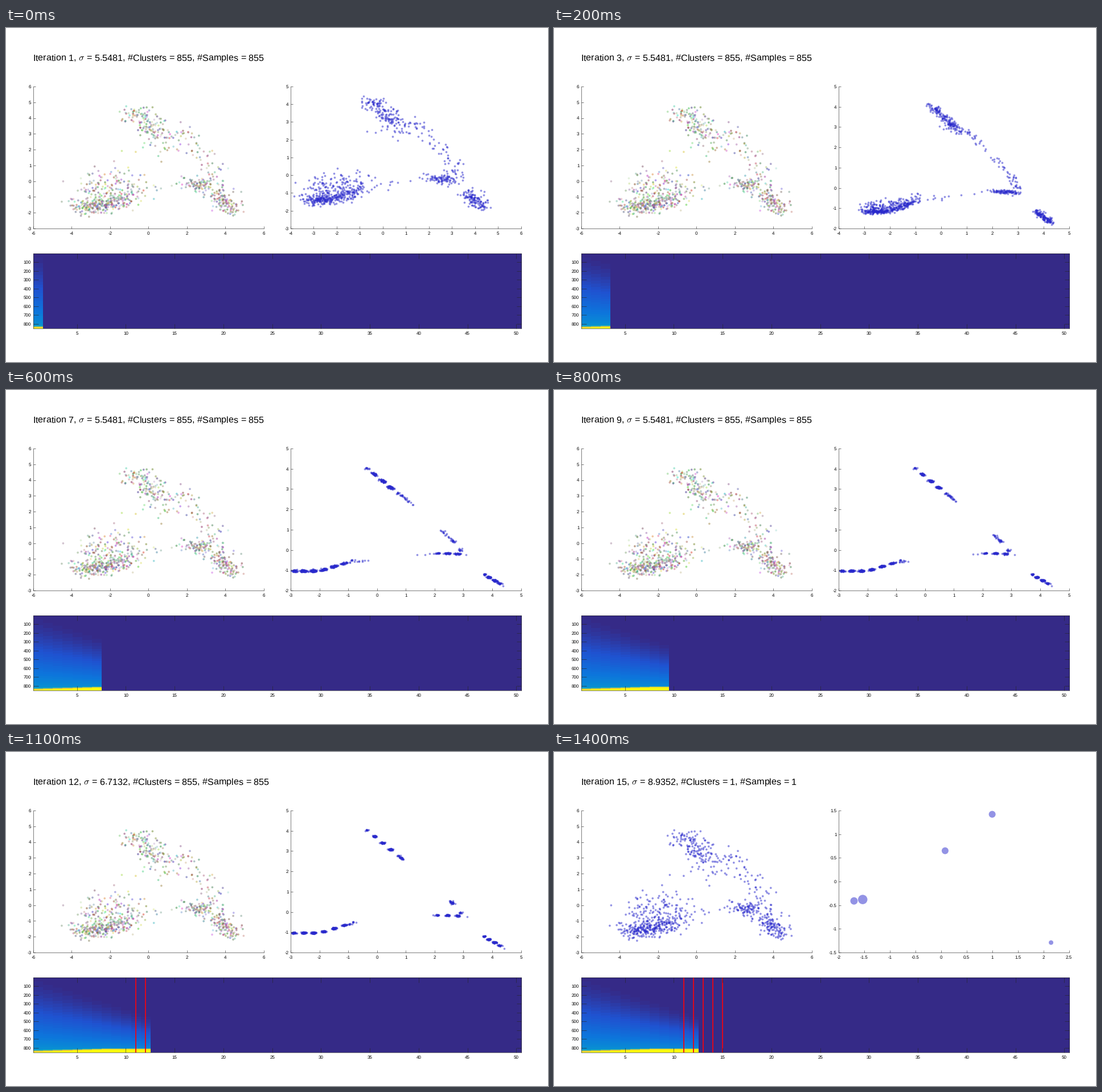
Write a matplotlib script that moves like this. It is 952x588 px and loops after 1500 ms.

```python
import colorsys
import math

import matplotlib.pyplot as plt
import numpy as np
from matplotlib.animation import FuncAnimation
from matplotlib.colors import LinearSegmentedColormap

W, H, DPI = 952, 588, 100
PX = 72 / DPI
FRAMES, INTERVAL = 15, 100
MERGE_AT = 13          # first iteration with merged clusters
HEAT_STOP = 12         # last iteration with a heat column
SIGMA = 5.54807
ROWS, COLS = 855, 50
DOT = 3.7
INK = "#262626"

plt.rcParams.update({
    "font.family": "Liberation Sans",
    "mathtext.fontset": "cm",
    "axes.unicode_minus": False,
    "text.hinting": "none",
    "axes.linewidth": 0.6 * PX,
    "axes.edgecolor": INK,
})

rng = np.random.default_rng(11)

BLUE = (0.16, 0.16, 0.80)
PALETTE = np.array([BLUE, (0.80, 0.16, 0.16), (0.17, 0.15, 0.32),
                    (0.16, 0.80, 0.16), (0.80, 0.20, 0.80)])
LEFT, TOP, MID, TAIL, STRAY = range(5)

parula = LinearSegmentedColormap.from_list("parula", [
    "#352a87", "#2052d0", "#0d75dc", "#079ccf", "#21b3ad",
    "#7abf7c", "#ccbb58", "#fec138", "#f9fb0e"])


# ---------- samples: each slides onto a ridge, then to a knot on it ----------

def strand(groups, n, start, end, knots, stretch, shift, noise):
    """Home, ridge and knot positions of n samples along one ridge."""
    start, end = np.array(start), np.array(end)
    u = rng.beta(0.6, 0.6, n) if knots == 1 else rng.beta(1.3, 1.9, n)

    def on_ridge(t):
        p = start + t[:, None] * (end - start)
        if groups == (LEFT, LEFT):
            p[:, 1] += 0.44 * np.maximum(0, p[:, 0] + 2)
        return p

    ridge = on_ridge(u)
    knot = on_ridge(np.round(u * knots) / knots)
    home = (ridge + (stretch - 1) * (ridge - ridge.mean(axis=0))
            + shift + rng.normal(0, 1, (n, 2)) * noise)
    return home, ridge, knot, np.where(u < 0.5, *groups)


LEFT_RIDGE = (-2.9, -1.03), (-0.8, -1.03), 6
TAIL_RIDGE = (3.7, -1.2), (4.45, -1.8), 4
strands = [
    strand((LEFT, LEFT), 285, *LEFT_RIDGE, 1.3, (-.3, -.45), (.5, .28)),
    strand((LEFT, LEFT), 115, *LEFT_RIDGE, 1.3, (-.1, .75), (.55, .5)),
    strand((TOP, TOP), 125, (-.35, 4.05), (.75, 2.75), 4, 1.5, (-.3, .3), (.45, .3)),
    strand((TOP, TOP), 40, (.2, 3.4), (.75, 2.75), 2, 1.5, (.2, -.4), (.6, .6)),
    strand((MID, MID), 80, (2.1, -.15), (3.15, -.2), 3, 1.4, (.1, -.1), (.3, .2)),
    strand((MID, MID), 20, (2.6, .45), (2.9, -.05), 1, 1, (.5, .2), (.5, .4)),
    strand((TOP, MID), 45, (.8, 2.7), (2.65, .4), 1, 1, (.9, .4), (.3, .3)),
    strand((LEFT, MID), 20, (-1.1, -.62), (2.12, -.15), 1, 1, (0, .2), (.3, .3)),
    strand((TAIL, TAIL), 105, *TAIL_RIDGE, 1.9, (0, .05), (.25, .25)),
    strand((STRAY, STRAY), 20, *TAIL_RIDGE, 1.5, (0, .4), (.6, .45)),
]
home, ridge, knot, group = (np.concatenate(part) for part in zip(*strands))
jitter = rng.normal(0, 1, home.shape) * (0.035, 0.015)
draw_order = rng.permutation(ROWS)


def condensed(k):
    along = math.exp(-(k / 8) ** 2)
    across = math.exp(-0.5 * k)
    return knot + (ridge - knot) * along + (home - ridge) * across + jitter


single_colors = np.array([
    colorsys.hsv_to_rgb(rng.random(), rng.uniform(0.15, 0.75),
                        rng.uniform(0.5, 0.92)) for _ in range(ROWS)])


def sample_colors(k):
    if k < MERGE_AT:
        return single_colors
    if k == MERGE_AT:
        return PALETTE[group]
    if k == MERGE_AT + 1:
        return PALETTE[(group >= MID).astype(int)]
    return PALETTE[np.zeros_like(group)]


MERGED = [(-1.70, -.41), (-1.53, -.38), (.08, .65), (1.0, 1.42), (2.15, -1.29)]
MERGED_SIZE = [13, 16.5, 12, 12, 8]


# ---------- heat map ----------

def heat_column(k):
    r = np.arange(ROWS) / ROWS
    start = 0.045 * (k - 1)
    v = 0.36 * np.clip((r - start) / (1 - start), 0, 1) ** 1.4
    v = np.round(v * 70) / 70
    grown = min(1, (k - 1) / 7)
    edge, ramp = 0.962 - 0.02 * grown, 0.03 - 0.012 * grown
    return v + (1 - v) * np.clip((r - edge) / ramp, 0, 1)


heat = np.column_stack([heat_column(k) for k in range(1, HEAT_STOP + 1)])


# ---------- figure ----------

fig = plt.figure(figsize=(W / DPI, H / DPI), dpi=DPI, facecolor="white")


def panel(x0, y0, x1, y1):
    ax = fig.add_axes([x0 / W, 1 - y1 / H, (x1 - x0) / W, (y1 - y0) / H])
    for axis, pad in (("x", 5), ("y", 3.5)):
        ax.tick_params(axis=axis, direction="in", length=4 * PX, width=0.6 * PX,
                       pad=pad * PX, labelsize=8 * PX, color=INK,
                       labelcolor="black")
    return ax


def set_ticks(ax, xlim, ylim, xstep, ystep):
    for axis, (lo, hi), step in ((ax.xaxis, xlim, xstep), (ax.yaxis, ylim, ystep)):
        ticks = np.arange(lo, hi + step / 2, step)
        axis.set_ticks(ticks, [f"{t:g}" for t in ticks])
    ax.set_xlim(*xlim)
    ax.set_ylim(*ylim)


def dot_area(d):
    return (np.asarray(d) * PX) ** 2


def dots(ax):
    ax.spines[["top", "right"]].set_visible(False)
    return ax.scatter(*home[draw_order].T, s=dot_area(DOT), color=[BLUE],
                      alpha=0.5, linewidths=0, clip_on=False)


left_ax = panel(48, 103, 452.5, 353)
right_ax = panel(500, 103, 904.5, 353)
heat_ax = panel(47.5, 397, 905, 529.3)

left_dots = dots(left_ax)
right_dots = dots(right_ax)
set_ticks(left_ax, (-6, 6), (-3, 6), 2, 1)

image = heat_ax.imshow(np.zeros((ROWS, COLS)), cmap=parula, vmin=0, vmax=1,
                       aspect="auto", interpolation="nearest",
                       extent=(0.5, COLS + 0.5, ROWS + 0.5, 0.5))
heat_ax.set_xticks(range(5, 51, 5))
heat_ax.set_yticks(range(100, 801, 100))
heat_ax.tick_params(top=True, right=True, length=8.5 * PX)
heat_ax.set_axisbelow(False)
marks = {k: heat_ax.axvline(k, color=(0.93, 0.02, 0.08), lw=1.8 * PX)
         for k in range(11, 16)}

title = fig.text(46.7 / W, 1 - 57.5 / H, "", fontsize=16.1 * PX, color="black",
                 va="baseline", ha="left")


def limits(k):
    if k >= MERGE_AT:
        return (-2, 2.5), (-1.5, 1.5), 0.5
    if k == 1:
        return (-4, 6), (-3, 5), 1
    return (-4 if k < 4 else -3, 5), (-2, 5), 1


def update(frame):
    k = frame + 1
    sigma = SIGMA * 1.1 ** max(0, k - 10)
    count = {13: 5, 14: 2, 15: 1}.get(k, ROWS)
    title.set_text(rf"Iteration {k}, $\sigma$ = {sigma:.4f}, "
                   f"#Clusters = {count}, #Samples = {count}")

    left_dots.set_facecolor(sample_colors(k)[draw_order])

    xlim, ylim, step = limits(k)
    set_ticks(right_ax, xlim, ylim, step, step)
    merged = k >= MERGE_AT
    right_dots.set_offsets(MERGED if merged else condensed(k))
    right_dots.set_sizes(dot_area(MERGED_SIZE if merged else [DOT]))

    shown = min(k, HEAT_STOP)
    grid = np.zeros((ROWS, COLS))
    grid[:, :shown] = heat[:, :shown]
    image.set_data(grid)
    for at, line in marks.items():
        line.set_visible(at <= k)
    return []


anim = FuncAnimation(fig, update, frames=FRAMES, interval=INTERVAL,
                     init_func=lambda: update(0), repeat=True, repeat_delay=0,
                     blit=False)
plt.show()
```
